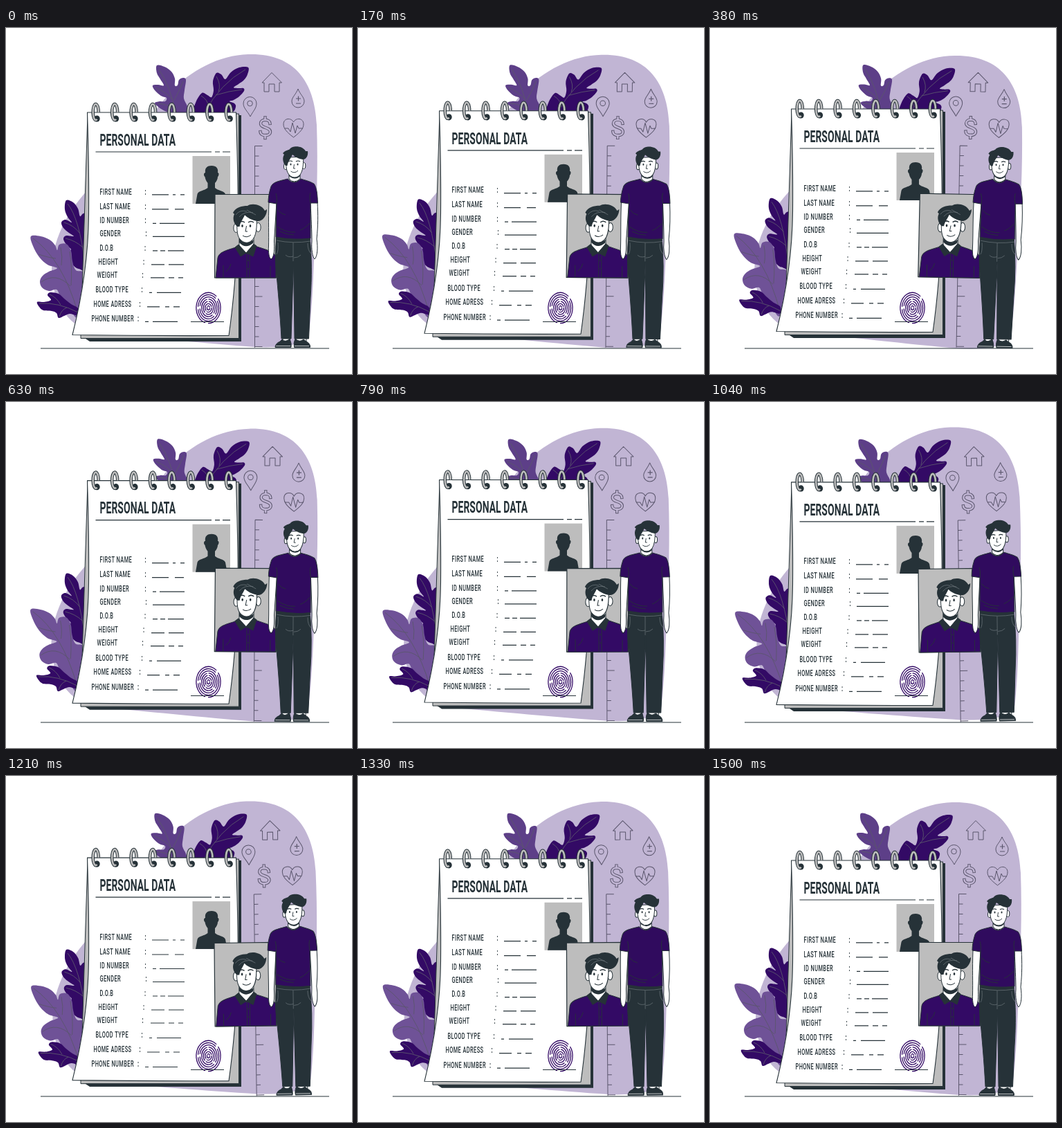
An HTML page with a canvas for the animation above (1540 ms loop, 500 by 500 pixels).

```html
<!DOCTYPE html>
<html lang="en">
<head>
<meta charset="utf-8">
<title>Personal data</title>
<style>
html, body { margin: 0; width: 100%; height: 100%; overflow: hidden; background: #fff; }
canvas { display: block; width: 500px; height: 500px; }
</style>
</head>
<body>
<canvas id="stage"></canvas>
<script>
const canvas = document.getElementById('stage');
const ctx = canvas.getContext('2d');
const ratio = window.devicePixelRatio || 1;
canvas.width = canvas.height = 500 * ratio;

const INK = '#263238', PURPLE = '#330a65', LILAC = '#c1b5d4', GREY = '#bdbdbd';
const LOOP = 1540, FPS = 24, CYCLE = 36;
const CONDENSED = 0.58;

const paths = new Map();
function shape(d, fill, stroke, width = 1) {
  if (!paths.has(d)) paths.set(d, new Path2D(d));
  const path = paths.get(d);
  if (fill) { ctx.fillStyle = fill; ctx.fill(path); }
  if (stroke) { ctx.strokeStyle = stroke; ctx.lineWidth = width; ctx.stroke(path); }
}

function oval(x, y, rx, ry, fill, stroke, width = 1, from = 0, to = Math.PI * 2) {
  ctx.beginPath();
  ctx.ellipse(x, y, rx, ry, 0, from, to);
  if (fill) { ctx.fillStyle = fill; ctx.fill(); }
  if (stroke) { ctx.strokeStyle = stroke; ctx.lineWidth = width; ctx.stroke(); }
}

// Closed Catmull-Rom curve through "x,y x,y ..." points.
function curve(list) {
  const p = list.trim().split(/\s+/).map(s => s.split(',').map(Number));
  const at = i => p[(i + p.length) % p.length];
  let d = `M${p[0]}`;
  p.forEach((a, i) => {
    const prev = at(i - 1), b = at(i + 1), next = at(i + 2);
    const c1 = a.map((v, k) => v + (b[k] - prev[k]) / 6);
    const c2 = b.map((v, k) => v - (next[k] - a[k]) / 6);
    d += `C${c1} ${c2} ${b}`;
  });
  return d + 'Z';
}

function label(text, x, y, size, weight, spacing) {
  ctx.save();
  ctx.translate(x, y);
  ctx.scale(CONDENSED, 1);
  ctx.font = `${weight} ${size}px Roboto, "Liberation Sans", sans-serif`;
  ctx.letterSpacing = spacing + 'px';
  ctx.fillStyle = INK;
  ctx.fillText(text, 0, 0);
  ctx.restore();
}

function swaying(x, y, degrees, draw) {
  ctx.save();
  ctx.translate(x, y);
  ctx.rotate(degrees * Math.PI / 180);
  ctx.translate(-x, -y);
  draw();
  ctx.restore();
}

const LEAVES = [
  ['#5d3f88', curve(`218,54 229,56 239,63 244,73 244,83 248,83 250,75 256,72 260,75 258,90
    257,102 262,113 262,122 240,123 226,118 215,109 222,106 230,106 232,101 224,98 215,90
    212,83 220,82 228,83 223,74 218,65`),
    'M221 60Q238 85 245 123M256 77Q250 92 243 104M216 86Q232 93 241 104M219 109Q234 110 244 118'],
  [PURPLE, curve(`350,57 349,67 344,75 336,81 329,86 336,87 343,87 344,91 337,99 329,104
    323,106 330,109 332,114 326,122 300,124 273,122 274,108 283,94 291,97 297,100 300,90
    299,77 304,65 311,67 317,74 325,64 337,57`),
    'M346 60Q310 80 287 122M304 70Q311 82 307 92M341 89Q322 91 303 97M282 98Q292 104 292 113'],
  [PURPLE, curve(`87,249 97,252 104,261 107,272 112,268 122,271 122,345 105,348 94,339 89,326
    94,320 88,314 83,305 87,300 98,301 91,296 83,289 80,281 86,277 95,281 89,273 85,262`),
    'M89 254Q106 275 114 340M84 281Q98 285 107 297M86 304Q100 307 111 317'],
  ['#6f5297', curve(`36,301 50,301 63,306 71,314 74,321 77,313 87,312 94,322 96,337 101,350
    113,354 113,380 104,418 94,408 88,396 78,386 73,378 62,380 52,375 49,366 53,358
    62,352 74,347 60,342 48,331 39,315`),
    'M39 304Q82 335 104 412M51 367Q72 352 93 373M79 317Q82 331 80 343M92 323Q96 346 94 372M47 327Q62 332 72 333'],
  [PURPLE, curve(`45,396 55,396 65,393 60,386 64,382 76,384 84,391 94,399 104,405 104,415
    92,413 84,416 76,419 73,412 66,409 54,408 48,403`),
    'M48 398Q76 396 104 411M63 385Q73 389 79 400M77 417Q80 407 88 404']
];

function drawBackdrop() {
  shape('M350 38C415 36 446 75 449 140C451 200 449 260 446 310C444 360 443 400 438 440' +
    'C436 458 400 463 360 461C290 456 200 447 130 441C95 435 66 400 66 350' +
    'C67 300 95 255 130 222C175 180 205 130 238 92C266 62 308 39 350 38Z', LILAC);
  for (const [colour, outline, veins] of LEAVES) {
    shape(outline, colour);
    shape(veins, null, '#5b566d', 0.9);
  }
}

function drawIcons() {
  const line = '#5b566d';
  shape('M370 79L384 64.5L398.5 79H395V92H388V81H380V92H373V79Z', null, line);
  shape('M353 128C349 120 343 116 343 109A9.5 9.5 0 0 1 362 109C362 116 357 120 353 128Z', null, line);
  oval(352.5, 109, 3.8, 3.8, null, line);
  shape('M422 88C419 96 413 100 413 106A9 9 0 0 0 431 106C431 100 425 96 422 88Z', null, line);
  shape('M419 102H426M422.5 98.5V105.5M419 109H426', null, line, 1.2);
  const dollar = 'M381.5 138C381 131 368 131 368 138C368 145 382 143 382 150C382 157 368 157 367.5 150M374.5 129.5V133M374.5 155V159';
  ctx.lineCap = 'square';
  shape(dollar, null, line, 4.4);
  shape(dollar, null, LILAC, 2.5);
  ctx.lineCap = 'butt';
  shape('M415.5 158C405 150 401 145 401 139C401 130 412 129 415.5 136C419 129 430 130 430 139C430 145 426 150 415.5 158Z', null, line);
  shape('M402.5 145H408L411 150L414 137L418 152L421 141L423 145H429', null, line);
  let ruler = 'M359.5 170.5V462';
  for (let i = 0; i <= 20; i++) ruler += `M359.5 ${170.5 + i * 14.5}h${i % 5 ? 6 : 11}`;
  shape(ruler, null, line);
}

// Label, x, baseline, colon x, then start-end pairs of the written strokes.
const ROWS = [
  ['FIRST NAME', 135.5, 240.5, 200.5, '211-235 241-245 252-258'],
  ['LAST NAME', 135.5, 261.5, 200.5, '211-235 244-257'],
  ['ID NUMBER', 135.5, 282, 200.5, '212-217 222-258'],
  ['GENDER', 135.5, 301, 201.5, '212-258'],
  ['D.O.B', 135.5, 321.5, 200, '212-219 223-230 234-257'],
  ['HEIGHT', 133.5, 341.5, 198, '210-229 235-257'],
  ['WEIGHT', 131.5, 360.5, 196.5, '209-229 235-243 249-256'],
  ['BLOOD TYPE', 129.5, 382, 195.5, '207-211 218-253'],
  ['HOME ADRESS', 126.5, 402.5, 192.5, '204-222 230-236 242-251'],
  ['PHONE NUMBER', 123.5, 424, 190, '201-206 212-248']
];

function drawFingerprint(x, y) {
  for (let i = 0; i < 7; i++) {
    const rx = 2 + i * 2.6, ry = 3 + i * 3.2;
    const gap = i * 2.4;
    oval(x, y, rx, ry, null, PURPLE, 1.3, gap, gap + 3.6);
    oval(x, y, rx, ry, null, PURPLE, 1.3, gap + 3.8, gap + 6.05);
  }
  shape('M267 424.5H315', null, INK, 1.1);
}

// The loop's right side ends behind the page; its left side curls into the hole.
function drawRing(x) {
  oval(x + 1.5, 131, 4.2, 4.6, INK);
  for (const [colour, width] of [[INK, 4.6], [GREY, 2.6]]) {
    oval(x - 0.3, 121.5, 4, 11.5, null, colour, width, 1.1, 6.3);
  }
}

function drawNotepad() {
  shape('M118 126H340V453H121L112 447Z', INK);
  shape('M118 124H336.5V448.5H108V442Z', GREY, INK);
  shape('M117.5 122H332.5C334 170 336 240 335 290C333 345 329 395 322 444.5' +
    'Q210 445 96 443.5C109 392 119 330 119.5 270C120 220 119 170 117.5 122Z', '#fff', INK, 1.1);
  for (let i = 0; i < 8; i++) drawRing(130 + i * 27.45);

  label('PERSONAL DATA', 135.5, 169.8, 24, 'bold', 0.1);
  shape('M129.5 179H297M302 179H309M313 179H324', null, INK, 1.2);

  ctx.fillStyle = GREY;
  ctx.fillRect(269.5, 185, 54.5, 69);
  shape('M274 254L276.5 240C278 235 287 235 291.5 231V224C289 221 288 218 287.5 215C285 213 286 209 288 209' +
    'C287 202 291 199 297 199C304 199 307 203 306 209C308 209 308 213 306 215C306 218 304 222 302 224V231' +
    'C306 235 315 235 317 240L319.5 254Z', INK);

  for (const [text, x, y, colon, marks] of ROWS) {
    label(text, x, y, 12.8, 500, 0.7);
    label(':', colon, y, 12.8, 'bold', 0);
    const strokes = marks.split(' ').map(m => {
      const [from, to] = m.split('-');
      return `M${from} ${y + 0.4}H${to}`;
    });
    shape(strokes.join(''), null, INK, 1.2);
  }
}

function drawPortrait() {
  shape('M302 240.5H390.5V361H301.5Z', GREY, INK, 1.2);
  shape('M303 361L306 332C308 324 316 322 332 317L346 324L360 315C374 320 386 322 390 330V361Z', PURPLE, INK);
  shape('M337 303V316L347 326L358 315V302Z', '#fff', INK);
  shape('M337 304Q344 314 358 306L357 311Q346 320 337 310Z', INK);
  oval(332.5, 289, 3.6, 6.5, '#fff', INK);
  oval(364.5, 288, 3.6, 6.5, '#fff', INK);
  shape('M335 270C333 286 333 299 338 305C343 311 350 312 355 307C362 301 363 288 362 270Z', '#fff', INK);
  shape('M334 287C329 282 327 275 330 269L328 267C332 259 341 257 349 257C354 253 369 254 374 264L377 262' +
    'C377 272 370 280 363 279C356 278 348 274 345 270C343 276 339 279 337.5 287Z', INK);
  shape('M332 270Q338 262 348 265M337 273Q345 264 357 267M348 263L361 270', null, '#727b80', 0.7);
  oval(341.5, 286, 1.3, 2, INK);
  oval(353, 286, 1.3, 2, INK);
  shape('M337.5 281Q341 278 345 281M350 281Q354 278 358 281', null, INK, 1.5);
  shape('M347.5 286L346 294H349M342 300Q348 304 354 299', null, INK);
  shape('M336 313L331 317L339 330L347 325ZM358 312L362 315L357 330L347 325Z', INK, INK);
  shape('M348 326V361M352 329V361M314 361V343M382 361V344M318 352Q324 347 325 341', null, INK, 0.9);
  for (const y of [336, 348]) oval(350, y, 0.9, 0.9, INK);
}

function drawMan() {
  shape('M380 252C379 280 380 300 379.5 315C379 324 380 332 383 334C388 331 388 318 387.5 308L391 252Z', '#fff', INK);
  shape('M440 252C441 275 442 295 442 308C441 320 443 331 446 334C450 330 451 318 449 305C451 285 451 270 450 252Z', '#fff', INK);
  shape('M400 446H410V453H400ZM419 446H434V453H419Z', '#fff', INK);
  shape('M399 450Q404 455 410 449Q413 456 412 461.5H389Q389 456 396 453Z', INK, INK);
  shape('M418 449Q424 455 430 450L434 453Q440 456 439.5 461.5H416.5Q415 455 418 449Z', INK, INK);
  shape('M390 459.5H411M417 459.5H438', null, '#fff', 0.7);
  shape('M391 300Q415 307 439 303C442 330 442 360 440 390L437.5 449H417L415.5 338L412 449H398' +
    'C396 410 393 380 390.5 350C388 330 390 315 391 300Z', INK, INK);
  shape('M391 307Q415 312 440 308M393 310Q394 323 391 327M436 311Q436 322 441 326M415 310V337' +
    'M415 330Q408 332 404 328M416 332Q422 332 426 328', null, '#6d777c', 0.7);
  shape('M407 218C396 221 386 222 383 229C380 238 379 246 379 252L391 254L390 302Q415 307 440 304' +
    'L440 253L450.5 253C450 240 449 230 445 225C438 221 432 220 426 218Q416 228 407 218Z', '#300b5e', INK);
  shape('M391 254Q392 244 390 239M440 253Q438 243 440 238M392 287Q405 296 418 295M396 294Q406 299 416 299' +
    'M439 282Q430 291 425 292M393 263Q398 269 404 270', null, INK, 0.9);
  shape('M409 208V218Q416 226 425 218V208Z', '#fff', INK);
  shape('M409 211Q417 219 425 210V214Q418 221 409 214Z', INK);
  oval(403.8, 200, 2.3, 4.5, '#fff', INK);
  oval(430.5, 199, 2.3, 4.5, '#fff', INK);
  shape('M405 187C404 200 405 208 410 213C414 217 421 217 425 212C429 206 430 198 429.5 186Z', '#fff', INK);
  shape('M404 199C400 195 399 187 402 183L400 181C404 176 408 177 410 175C413 170 428 169 433 178L436 178' +
    'C437 184 434 190 429 190C423 189 417 186 414 183C412 188 408 191 406.5 199Z', INK);
  oval(411.5, 197, 1, 1.5, INK);
  oval(421.5, 197, 1, 1.5, INK);
  shape('M408 193Q411 191 414 193M419 193Q422 191 425 193', null, INK, 1.2);
  shape('M416.5 197L415.5 203H418M411.5 207Q417 211 422 206', null, INK, 0.9);
}

function wind(p) {
  if (p < 0.25) return 4 * p;
  return p < 0.75 ? 2 - 4 * p : 4 * p - 4;
}

function render(ms) {
  const step = Math.min(CYCLE, Math.floor((ms % LOOP + 5) * FPS / 1000));
  const phase = step / CYCLE % 1;
  const tilt = wind(phase);
  const lift = -10 * (1 - Math.abs(1 - 2 * phase));

  ctx.setTransform(ratio, 0, 0, ratio, 0, 0);
  ctx.fillStyle = '#fff';
  ctx.fillRect(0, 0, 500, 500);
  ctx.lineJoin = 'round';

  swaying(243, 251, tilt, drawBackdrop);
  swaying(389, 263, tilt, drawIcons);
  shape('M50 463H467', null, INK, 1.1);
  ctx.save();
  ctx.translate(0, lift);
  drawNotepad();
  ctx.restore();
  drawFingerprint(292.5, 404.5);
  swaying(376, 316, tilt, () => { drawPortrait(); drawMan(); });
}

const start = performance.now();
function tick() {
  render(performance.now() - start);
  requestAnimationFrame(tick);
}
tick();
</script>
</body>
</html>
```
